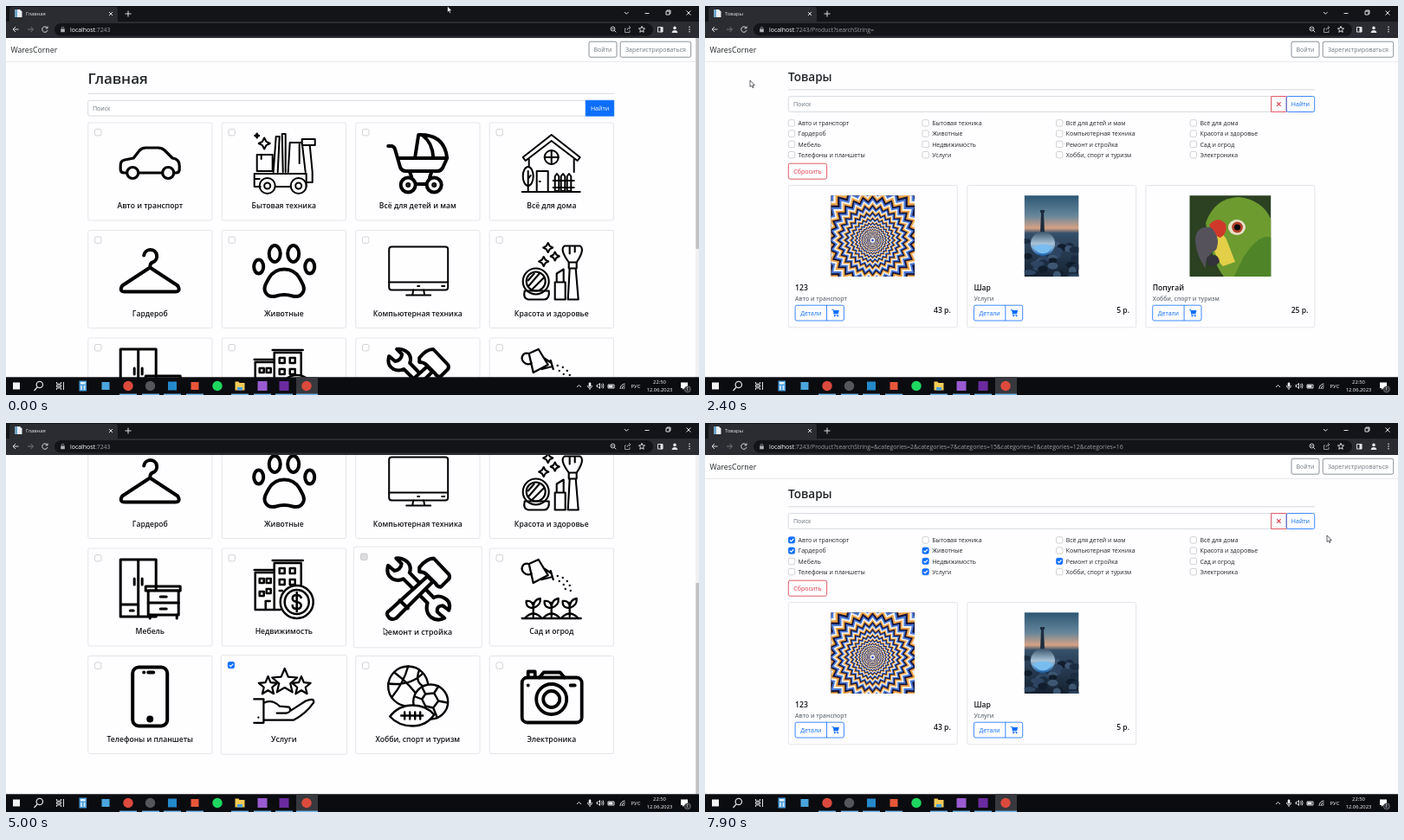
Animation of 800x450 px, one loop 8 s. Source, as an HTML page:

```html
<!DOCTYPE html>
<html lang="ru">
<head>
<meta charset="utf-8">
<style>
html, body { margin: 0; width: 100%; height: 100%; overflow: hidden; background: #fefdff; }
svg { display: block; width: 800px; height: 450px; }
text { font-family: "Open Sans", "Noto Sans", sans-serif; fill: #212529; white-space: pre; }
.semi { font-weight: 600; }
.mid { text-anchor: middle; }
.end { text-anchor: end; }
.ink, .ink * { fill: none; stroke: #000; stroke-linejoin: round; stroke-linecap: round; }
.ink .solid { fill: #000; }
.ink .paper { fill: #fefdff; }
.line { fill: none; stroke: #d9dbde; stroke-width: 1; }
.box rect { fill: #fff; stroke: #b5b5b8; stroke-width: .6; }
.box path { fill: none; }
.box.on rect { fill: #0d6efd; stroke: #0d6efd; }
.box.on path { stroke: #fff; stroke-width: 1.1; }
.box.down rect { fill: #dcdcdf; }
.box.ring rect { stroke: #9ec5fe; stroke-width: 3; paint-order: stroke; }
</style>
</head>
<body>
<svg id="stage" viewBox="0 0 800 450"></svg>
<script>
const LOOP = 8000, MAX_SCROLL = 239;
const BLUE = '#0d6efd', RED = '#dc3545', GREY = '#6c757d', LIGHT = '#e4e5e8';
const names = ['Авто и транспорт', 'Бытовая техника', 'Всё для детей и мам', 'Всё для дома',
  'Гардероб', 'Животные', 'Компьютерная техника', 'Красота и здоровье',
  'Мебель', 'Недвижимость', 'Ремонт и стройка', 'Сад и огрод',
  'Телефоны и планшеты', 'Услуги', 'Хобби, спорт и туризм', 'Электроника'];

// Markup helpers
const text = (x, y, s, size, fill = '#212529', cls = '', id = '') =>
  `<text x="${x}" y="${y}" font-size="${size}" class="${cls}" style="fill:${fill}" id="${id}">${s}</text>`;
const rect = (x, y, w, h, fill = 'none', stroke = 'none', rx = 0, sw = .8) =>
  `<rect x="${x}" y="${y}" width="${w}" height="${h}" rx="${rx}" fill="${fill}" stroke="${stroke}" stroke-width="${sw}"/>`;
const path = (d, more = '') => `<path d="${d}" ${more}/>`;
const circle = (x, y, r, more = '') => `<circle cx="${x}" cy="${y}" r="${r}" ${more}/>`;
const oval = (x, y, rx, ry, more = '') => `<ellipse cx="${x}" cy="${y}" rx="${rx}" ry="${ry}" ${more}/>`;
const box = (x, y, id) => `<g class="box" id="${id}"><rect x="${x}" y="${y}" width="7.4" height="7.4" rx="1.8"/>` +
  path(`M${x + 1.7} ${y + 3.8}l1.5 1.5 2.8-3`) + '</g>';
const button = (x, y, w, s, color, fill = 'none', rx = 2) =>
  rect(x, y, w, 18, fill, color, rx) + text(x + w / 2, y + 11.8, s, 7, fill === 'none' ? color : '#fff', 'mid');
const star = (x, y, r, k = .45, n = 5) => Array.from({ length: 2 * n }, (_, i) => {
  const a = i * Math.PI / n, q = i % 2 ? r * k : r;
  return `${(x + q * Math.sin(a)).toFixed(1)},${(y - q * Math.cos(a)).toFixed(1)}`;
}).join(' ');
const polygon = (points, more = '') => `<polygon points="${points}" ${more}/>`;
const spark = (x, y, r) => polygon(star(x, y, r, .48, 4));

// Category icons: stroke width and shapes in a 72 x 72 box
const sprout = x => path(`M${x} 68V52M${x} 58Q${x - 9} 58 ${x - 8} 50Q${x} 49 ${x} 58Q${x + 9} 55 ${x + 8} 47Q${x} 48 ${x} 58`);
const paper = 'class="paper"', solid = 'class="solid"';
const icons = [
  [3.2, path('M9 47H6Q2 47 2 43V38Q2 33 7 32L17 30 24 21Q27 18 31 18H45Q50 18 53 21L62 30Q70 31 70 39V43Q70 47 66 47H64M23 47H50') +
    circle(16, 47, 6.5) + circle(57, 47, 6.5)],
  [2, path('M9 63H2V48H62V63H62M26 63H44M5 26H23V45H5ZM10 26V31M24 46L27 5H31L29 46M35 46L34 2H38V46M41 46L43 12H57L61 46M54 14V36M57 8H72V15H57ZM66 15L69 46V58H62M2 54H8') +
    circle(17, 62, 9) + circle(17, 62, 3.5) + circle(53, 62, 9) + circle(53, 62, 3.5) + spark(13.5, 13, 6.5) + spark(5, 4, 2.5)],
  [4, path('M2 16H5Q9 16 10 20L16 41Q18 45 22 45H59Q63 45 65 41L70 30H13M33 29L37 3Q67 2 70 30M42 4Q53 12 54 29M27 46L29 52M52 46L50 52M35 60H45') +
    circle(25, 61, 8.5) + circle(25, 61, 1, solid) + circle(55, 61, 8.5) + circle(55, 61, 1, solid)],
  [2, path('M3 29L36 3 69 29 66 33 36 10 6 33ZM10 31V40M62 31V46M2 69H69M19 68V45H32V68M22 57h1M9 68V45M9 54l3-4') +
    oval(9, 51, 6, 11) + circle(36, 29, 8) + path('M36 21V37M28 29H44') +
    [40, 47, 54].map(x => path(`M${x} 68V51L${x + 2.3} 48 ${x + 4.6} 51V68Z`)).join('') + path('M38 56H62M38 64H62')],
  [4, path('M29 18A7.5 7.5 0 1 1 39 26Q36 27 36 32L68 53Q72 60 65 60H7Q0 60 4 53L36 32')],
  [4, oval(7, 31, 5.5, 8) + oval(66, 31, 5.5, 8) + oval(25.5, 16, 6.5, 9.5) + oval(47, 16, 6.5, 9.5) +
    path('M36.5 34Q48 34 54 44C58 51 61 56 58 61 55 66 50 66 46 65Q36.500 62 27 65C23 66 18 66 15 61 12 56 15 51 19 44Q25 34 36.5 34Z')],
  [2, rect(3, 8, 68, 50, '', '', 3, 2) + path('M3 49H71M31 58L30 64M43 58L44 64M23 64H51M64 53.5h3M36 53.5h2')],
  [2.1, circle(18, 48, 15) + circle(18, 48, 11) + path('M10 53L22 39M14 57L27 44M9 47L16 39M5 59H33Q34 68 28 69H9Q3 68 5 59M40 69V49H52V69ZM42 49V39L50 34V49M55 69L57 33H64L67 69ZM56 33V26H65V33M56 26Q45 11 51 7H69Q75 11 65 26M57 8V16M63 8V14') +
    spark(32, 9, 5.5) + spark(27, 25, 5.5) + spark(40, 19, 5)],
  [3, path('M2 2H43V68H2ZM22.5 2V68M18 24V31M27 24V31M2 54H22M13 61h4') +
    rect(31, 33, 40, 5, '', '', 0, 3) + path('M34 38H69V66H34Z', paper) + path('M34 52H69M48 45H55M48 59H55M36 66V70M67 66V70')],
  [2.5, path('M3 60V17H25M2 14H24M25 60V6H56V34M23 3H58M3 60H32M15 60V50H20M8 39h5v5h-5ZM8 24h5v5h-5ZM16 24h5v5h-5ZM16 36h5v5h-5ZM31 12h6v6h-6ZM43 12h6v6h-6ZM31 25h6v6h-6ZM43 25h6v6h-6ZM31 38h3') +
    circle(51, 51, 19, paper) + circle(51, 51, 14) + path('M56 46Q55 43 51 43 46 43 46 47 46 50 51 51 56 52 56 55 56 59 51 59 46 59 46 55M51 40V62')],
  [4, path('M12 2L18 8Q17 15 10 16L3 10Q0 20 8 25 14 28 20 25L47 52Q44 62 51 68 58 73 66 69L58 62Q57 55 64 55L71 60Q74 50 65 46 59 43 54 46L27 18Q30 9 22 4 17 1 12 2Z') +
    path('M38 12Q46 2 54 2L71 20Q73 24 69 27L62 34Q58 34 56 30L46 20Q43 17 38 17ZM47 22L53 28 12 69Q6 72 3 67 0 63 5 60Z', paper) + path('M16 49L25 58')],
  [2.3, path('M10 7L21 2 32 20 15 29ZM10 7C2 5 0 13 4 17 7 20 11 20 13 18M27 12L36 18M25 25L37 22M35 15L38 25M2 70H70') +
    [[43, 21], [49, 23], [54, 27], [57, 32], [58, 38], [45, 27], [50, 31], [52, 36]].map(p => path(`M${p}h.1`)).join('') +
    [15, 36, 57].map(sprout).join('') + path('M6 69Q15 60 24 69M27 69Q36 60 45 69M48 69Q57 60 66 69')],
  [4, rect(16, 2, 40, 68, '', '', 7, 4) + circle(36, 62, 2, solid) + path('M34 8H40M29 8h.1')],
  [2.2, [[18, 24, 11], [56, 24, 11], [37, 19, 15]].map(s => polygon(star(...s), paper)).join('') +
    path('M2 39H13V66H2M7 60h.1M14 43Q23 39 31 47L42 48Q46 53 39 55H28M44 52L61 41Q71 37 70 43 61 56 47 63H14')],
  [2.4, circle(25, 24, 23) + path('M9 8Q28 22 40 41M2 21Q28 24 42 9M25 1Q20 20 6 37M38 5Q31 22 48 26') + circle(51, 42, 20, paper) +
    path('M45 33L55 32 60 41 54 49 45 47 41 39ZM45 33L41 25M55 32L60 24M60 41L70 43M54 49L58 59M41 39L33 36') +
    path('M4 59Q14 46 30 46 46 46 55 57 46 70 30 70 14 70 4 59Z', paper) + path('M17 58H42M21 54V62M27 54V62M33 54V62M39 54V62')],
  [3.8, rect(2, 14, 69, 52, '', '', 6, 3.8) + path('M9 13V7H17V13M22 14L27 8H46L51 14M9 23h.1M58 23H63') +
    circle(36, 39, 17.5) + circle(36, 39, 9.5)]
];

const cardX = i => 94.7 + i % 4 * 154.5;
const cardY = i => 135 + Math.floor(i / 4) * 124.5;
const homeCard = (name, i) => {
  const x = cardX(i), y = cardY(i), [w, art] = icons[i];
  return `<g id="card${i}">${rect(x, y, 143.3, 113, '#fefdff', '#dcdcdf', 2, .7)}${box(x + 7.8, y + 7.5, 'pick' + i)}
    <g class="ink" stroke-width="${w}" transform="translate(${x + 35.5} ${y + 11})">${art}</g>
    ${text(x + 71.6, y + 99, name, 8.6, '#111418', 'semi mid')}</g>`;
};

const navbar = right => rect(0, 37, 800, 27, '#fff') + path('M0 64.3H800', 'stroke="#e3e3e6" stroke-width=".8"') +
  text(5.5, 53.5, 'WaresCorner', 8.8) +
  button(right - 81.5, 41.2, 81.5, 'Зарегистрироваться', GREY) + button(right - 117.7, 41.2, 32, 'Войти', GREY);
const heading = (x, y, s, size) => text(x, y, s, size, '#212529', 'semi');
const divider = (x, y) => path(`M${x} ${y}h607.500`, 'stroke="#cfd0d2" stroke-width=".8"');

const home = `<g id="home"><g id="scroller">${navbar(790.7)}
  ${heading(94.5, 90.2, 'Главная', 17)}${divider(94.7, 101.3)}
  ${rect(94.7, 109.3, 575, 17.8, '#fff', '#ced4da', 2)}${text(100, 121, 'Поиск', 7, GREY)}
  ${button(669.2, 109.2, 32.6, 'Найти', BLUE, BLUE, 0)}${names.map(homeCard).join('')}</g>
  ${rect(796, 37, 4, 393, '#f1f1f3')}<rect id="thumb" x="796.3" y="37" width="3.7" height="244" fill="#c1c1c4"/></g>`;

// Products page
let seed = 7;
const random = () => (seed = seed * 16807 % 2147483647) / 2147483647;
const rings = Array.from({ length: 60 }, (_, k) => polygon(star(193.5, 271, 86 * .945 ** k, .88, 28),
  `fill="${['#f0a040', '#15153a', '#4a78d8', '#f6f1e6'][k % 4]}"`)).join('');
const stones = Array.from({ length: 34 }, (_, k) => oval(369 + random() * 63, 272 + k * 1.25, 4 + random() * 4, 2.5 + random() * 2,
  `fill="${['#1b2c42', '#2d4562', '#111d2c', '#3d5672'][k % 4]}"`)).join('');
const pictures = [
  [145.5, 96.5, rings + circle(193.5, 271, 1.3, 'fill="#2340d0"')],
  [368.8, 62.5, rect(368, 219, 64, 95, 'url(#dusk)') + stones + path('M387 262L388 239H387V236H392V239H391L392 262Z', 'fill="#1c2c3e"') +
    circle(390, 275, 14, 'fill="url(#glass)"') + path('M378 279Q390 272 402 279Q390 294 378 279', 'fill="#79bdf0"')],
  [559.5, 93.7, rect(559, 219, 95, 95, '#2b4122') + path('M578 251Q588 222 616 221 644 224 654 248V314H600Q586 300 578 251', 'fill="#6d9b30"') +
    path('M622 290Q640 262 654 268V314H610Z', 'fill="#4f8428"') + path('M583 262Q594 257 602 270L612 296 598 301Q588 292 583 262', 'fill="#e3cf48"') +
    path('M582 253Q592 242 601 252 604 262 595 268 588 267 582 253', 'fill="#d0382a"') + path('M584 256Q566 254 566 272 567 288 578 304 576 290 590 282 596 268 584 256', 'fill="#55525c"') +
    path('M579 291Q592 283 594 296 588 304 580 299Z', 'fill="#34323a"') + oval(614, 256, 10, 9, 'fill="#e6e2c8"') +
    circle(614.5, 256, 6.4, 'fill="#b3412a"') + circle(614.5, 256, 3.6, 'fill="#0c0a0a"')]
];
const goods = [['123', 0, '43 р.'], ['Шар', 13, '5 р.'], ['Попугай', 14, '25 р.']];
const product = ([title, cat, price], i) => {
  const x = 96.3 + i * 206.3, [px, pw, art] = pictures[i];
  return `<g id="good${i}">${rect(x, 207.5, 195, 164.3, '#fefdff', '#dcdcdf', 2, .7)}
    <clipPath id="clip${i}">${rect(px, 219.2, pw, 93.8)}</clipPath><g clip-path="url(#clip${i})">${art}</g>
    ${text(x + 7.8, 329.3, title, 8.6, '#111418', 'semi')}${text(x + 7.8, 341, names[cat], 6.8, GREY, 'semi')}
    ${text(x + 187.5, 355.3, price, 8.6, '#111418', 'semi end')}
    ${rect(x + 7.8, 346.2, 56.3, 17.8, 'none', BLUE, 2)}${path(`M${x + 44.2} 346V364`, `stroke="${BLUE}" stroke-width=".8"`)}
    ${text(x + 26, 358, 'Детали', 7, BLUE, 'mid')}
    <g transform="translate(${x + 50} 351)" fill="${BLUE}">${path('M0 0H2L2.5 1H8.6L7.5 5H3L3.2 5.8H7.6V6.5H2.6L1.4.8H0Z')}${circle(3.5, 7.4, .9)}${circle(7, 7.4, .9)}</g></g>`;
};
const products = `<g id="products">${navbar(794.7)}
  ${heading(96, 86.5, 'Товары', 13.6)}${divider(96.3, 96.8)}
  ${rect(96.3, 104.6, 557.5, 17.8, '#fff', '#ced4da', 2)}${text(102, 116.4, 'Поиск', 7, GREY)}
  ${rect(653.7, 104.6, 17.5, 17.8, 'none', RED)}${path('M660.2 111.3l4.4 4.4m0-4.4l-4.4 4.4', `stroke="${RED}" stroke-width="1.1"`)}
  ${button(671.2, 104.5, 32.5, 'Найти', BLUE)}
  ${names.map((s, i) => {
    const x = 96.3 + i % 4 * 154.6, y = 131.7 + Math.floor(i / 4) * 12.25;
    return box(x, y, 'filter' + i) + text(x + 11.3, y + 6.4, s, 6.95);
  }).join('')}
  ${button(96.3, 182.2, 44.3, 'Сбросить', RED)}${goods.map(product).join('')}</g>`;

// Browser frame and taskbar
const browser = rect(0, 0, 800, 37, '#131418') + path('M0 18H4V4Q4 1 7 1H126Q129 1 129 4V18H800V37H0Z', 'fill="#2b2c31"') +
  rect(56, 20, 691, 14.6, '#131418', 'none', 7.3) +
  path('M10.5 4H16L18.5 6.5V13H10.5Z', 'fill="#e9eef3"') + rect(10.5, 4, 2.5, 9, '#6ba6cf') +
  text(23, 11, '', 5.85, LIGHT, '', 'tab') +
  `<g class="line">${path('M119 7l4 4m0-4l-4 4M141 5.5v7M137.5 9h7M714 7l2.3 2.3L718.6 7M737.5 8.5h5M762 6h4v4h-4ZM763 6V5h4v4h-1M785.5 5.5l5 5m0-5l-5 5M14.5 27H8.5M11 24L8 27l3 3')}
  ${path('M25 27h6M28.5 24l3 3-3 3', 'stroke="#75777c"')}${path('M47.6 25.3A3.2 3.2 0 1 0 48 28M48 23.5v2.3h-2.4')}
  ${circle(700.5, 26.5, 2.4)}${path('M702.3 28.3l2 2M699.5 26.5h2')}
  ${path('M716 26h-1.5v4.5h5.5V28M717 28q0-3 3.5-3M719 23l2 2-2 2', 'stroke="#8f9196"')}
  ${polygon(star(734, 27.2, 3.8))}${path('M752.5 24.5h5.5v5.5h-5.5Z')}</g>` +
  rect(755.5, 24.5, 2.7, 5.6, LIGHT) + circle(772, 25.4, 1.8, `fill="${LIGHT}"`) + path('M768.6 31Q769 28 772 28T775.4 31Z', `fill="${LIGHT}"`) +
  [24.3, 27, 29.7].map(y => circle(789, y, .8, `fill="${LIGHT}"`)).join('') +
  rect(63.2, 26.5, 4.6, 3.8, '#aeb1b6', 'none', .5) + path('M64.2 27V25.6a1.3 1.3 0 0 1 2.6 0V27', 'fill="none" stroke="#aeb1b6" stroke-width=".7"') +
  `<text x="74" y="29.8" font-size="6.9" style="fill:#fff">localhost<tspan id="url" fill="#999ca2"></tspan></text>`;

const squares = [[12, '#f2f2f2', 8], [115, '#4aa5dc', 9], [192, '#2489ca', 10], [218, '#e8563a', 9], [296, '#9a5bd0', 11], [321, '#6a2ba0', 11]];
const discs = [[141, '#dc4a3d'], [166.5, '#55565b'], [244, '#1ed760'], [347, '#dc4a3d']];
const taskbar = rect(0, 429.3, 800, 20.7, '#0b0c10') + rect(335, 429.3, 25, 20.7, '#37383d') +
  [[131, 20], [157, 20], [182, 20], [208, 20], [260, 20], [286, 20], [311, 20], [335, 25]].map(([x, w]) => rect(x, 448.6, w, 1.4, '#76b9ed')).join('') +
  squares.map(([x, c, s]) => rect(x - s / 2, 439.5 - s / 2, s, s, c)).join('') +
  discs.map(([x, c]) => circle(x, 439.5, 5.7, `fill="${c}"`)).join('') +
  rect(84.5, 433.5, 8.5, 12, '#4ba0dd') + rect(86, 435, 5.5, 2.5, '#e8f3fb') +
  [87, 90.5].map(x => rect(x - .8, 439, 1.6, 5, '#dceefa')).join('') +
  path('M264.5 434.5h4l1 1.5h6v8.5h-11Z', 'fill="#f6cb57"') + rect(267, 441, 6, 3.5, '#4c9fdc') +
  `<g class="line">${circle(38.8, 438, 3.7, 'stroke-width="1.3"')}${path('M36 441l-3.5 4', 'stroke-width="1.3"')}
  ${path('M58.5 435v2h5v-2M58.5 444v-2h5v2M58.5 438.5h5v2h-5ZM66.5 435v9M659 441l2.5-2.5 2.5 2.5M682 438.5h1.5l2-2v6l-2-2H682ZM687.5 437.5q1.3 2 0 4M689 436.5q2 3 0 6M695 438h7v4h-7ZM709 443q0-5 5.5-6M711 443q0-3 3.5-4M713 443q0-1.5 1.5-2')}</g>` +
  rect(695.5, 438.5, 5, 3, LIGHT) + rect(672.7, 435.5, 2.6, 5, '#fff', 'none', 1.3) + path('M671.5 439q0 3 2.5 3t2.5-3M674 442v2', 'class="line"') +
  text(721.5, 442, 'РУС', 5.9, '#fff') + text(754.5, 437.3, '22:50', 5.8, '#fff', 'mid') + text(754.5, 446, '12.06.2023', 5.8, '#fff', 'mid') +
  path('M779 435.5h8v6.5h-4l-2 2v-2h-2Z', 'fill="#fff"') + circle(786.8, 443.3, 3.6, 'fill="#303238" stroke="#aaa" stroke-width=".5"') +
  text(786.8, 445.3, '1', 5, '#fff', 'mid');

const stage = document.getElementById('stage');
stage.innerHTML = `<defs>
  <linearGradient id="dusk" x2="0" y2="1"><stop stop-color="#2c5674"/><stop offset=".25" stop-color="#66869a"/><stop offset=".4" stop-color="#d6a284"/><stop offset=".46" stop-color="#35506a"/><stop offset="1" stop-color="#142030"/></linearGradient>
  <linearGradient id="glass" x2="0" y2="1"><stop stop-color="#3c556c"/><stop offset=".5" stop-color="#a9c4d8"/><stop offset="1" stop-color="#1a5fa8"/></linearGradient></defs>
  ${rect(0, 0, 800, 450, '#fefdff')}${home}${products}${browser}${taskbar}
  <path id="cursor" d="M0 0V7.5L1.7 6 2.9 8.6 4.1 8 3 5.6H5.3Z" fill="#fff" stroke="#000" stroke-width=".6"/>`;
const $ = id => document.getElementById(id);

// Timeline
const moves = [[0, 509.5, 0], [300, 600, 60], [700, 685, 118], [1150, 685, 118], [1400, 600, 180], [1700, 313, 231], [1900, 250, 215],
  [2400, 52, 86], [2700, 11, 26], [2900, 11, 26], [3300, 150, 200], [3500, 165, 315], [3600, 165, 315], [3800, 270, 317], [4000, 297, 317],
  [4200, 297, 317], [4650, 320, 330], [4700, 320, 330], [4850, 436, 237], [5100, 436, 237], [5350, 325, 215], [5550, 325, 215],
  [5900, 689, 152], [6100, 685, 118], [6400, 685, 118], [6900, 718, 130], [LOOP, 718, 130]];
const picks = [[0, 3300], [4, 3600], [5, 4100], [13, 4700], [10, 5100], [9, 5400]];
const ramp = (t, a, b) => { const p = Math.min(1, Math.max(0, (t - a) / (b - a))); return p * p * (3 - 2 * p); };
const scrollAt = t => MAX_SCROLL * (ramp(t, 4200, 4500) - ramp(t, 5450, 5700));
const onProducts = t => t >= 1200 && t < 2900 || t >= 6600;

function cursorAt(t) {
  const i = Math.max(1, moves.findIndex(m => m[0] >= t));
  const [t0, x0, y0] = moves[i - 1], [t1, x1, y1] = moves[i], p = (t - t0) / (t1 - t0);
  return [x0 + (x1 - x0) * p, y0 + (y1 - y0) * p];
}
function hovered(i, t) {
  if (t < 0 || onProducts(t)) return 0;
  const [x, y] = cursorAt(t), dx = x - cardX(i), dy = y + scrollAt(t) - cardY(i);
  return dx > 0 && dx < 143.3 && dy > 0 && dy < 113 ? 1 : 0;
}
// Hover grows linearly over 300 ms
function hoverScale(i, t) {
  let sum = 0;
  for (let k = 0; k < 15; k++) sum += hovered(i, t - k * 20);
  return 1 + .048 * sum / 15;
}

function draw(t) {
  const listing = onProducts(t), filtered = t >= 6600, scroll = scrollAt(t);
  $('home').style.display = listing ? 'none' : '';
  $('products').style.display = listing ? '' : 'none';
  $('good2').style.display = filtered ? 'none' : '';
  $('tab').textContent = listing ? 'Товары' : 'Главная';
  $('url').textContent = ':7243' + (listing ? '/Product?searchString=' : '') +
    (filtered ? [2, 7, 15, 1, 12, 16].map(n => '&categories=' + n).join('') : '');
  $('scroller').setAttribute('transform', `translate(0 ${-scroll})`);
  $('thumb').setAttribute('y', 37 + scroll * 148 / MAX_SCROLL);
  const last = picks.filter(p => t >= p[1] - 100).pop();
  names.forEach((_, i) => {
    const pick = picks.find(p => p[0] === i), on = pick && t >= pick[1];
    const active = last && last[0] === i;
    $('pick' + i).setAttribute('class', 'box' + (on ? ' on' : '') + (active ? (on ? ' ring' : ' down') : ''));
    $('filter' + i).setAttribute('class', 'box' + (on ? ' on' : ''));
    const cx = cardX(i) + 71.65, cy = cardY(i) + 56.5;
    $('card' + i).setAttribute('transform', `translate(${cx} ${cy}) scale(${hoverScale(i, t)}) translate(${-cx} ${-cy})`);
  });
  $('cursor').setAttribute('transform', `translate(${cursorAt(t)})`);
}

function tick() {
  draw(Math.floor(performance.now() % LOOP / 100) * 100);
  requestAnimationFrame(tick);
}
tick();
</script>
</body>
</html>
```
